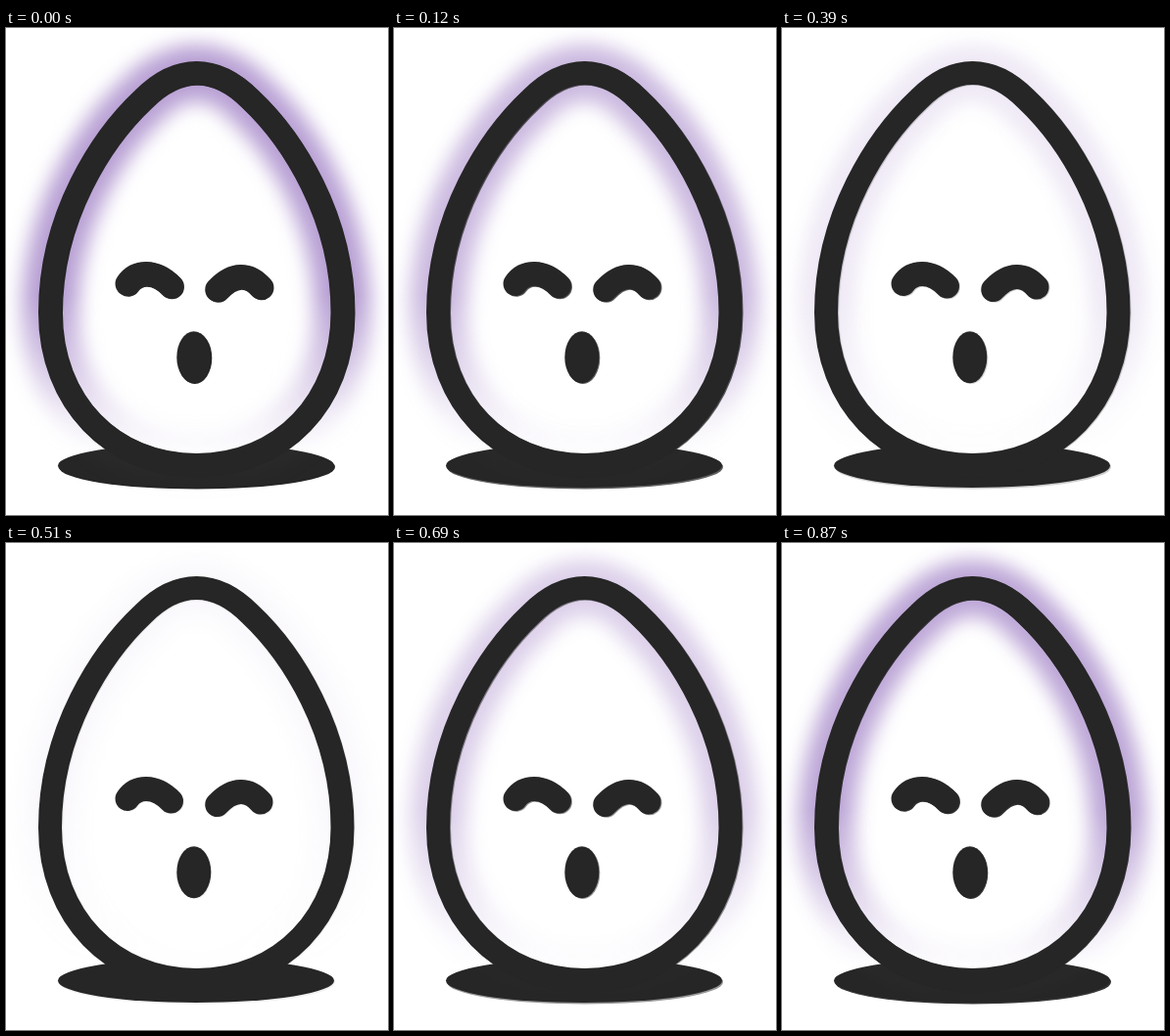
Write an HTML page that moves like this. It is 390 by 498 pixels and loops after 0.9 s.

```html
<!DOCTYPE html>
<html lang="en">
<head>
<meta charset="utf-8">
<title>Glowing egg</title>
<style>
  html, body { margin: 0; width: 100%; height: 100%; overflow: hidden; background: #fff; }
  svg { display: block; width: 390px; height: 498px; }
</style>
</head>
<body>
<svg viewBox="0 0 390 498">
  <defs>
    <path id="shell" d="M194.5 46 C172 46 155 57.5 140 72.5 C98 112 45 192 45 291
      C45 382 108 447 194.5 447 C281 447 343.5 382 343.5 291
      C343.5 192 291 112 249 72.5 C234 57.5 217 46 194.5 46Z"/>
    <ellipse id="ground" cx="194" cy="447.5" rx="141" ry="22.5" fill="#262626"/>
    <g id="ink" stroke-linecap="round" fill="none" stroke="#262626">
      <use href="#shell" stroke-width="24"/>
      <path stroke-width="25" d="M124 261.5 C133 248.5 152 247 168.5 264 M215.7 267.5 C232 250 248 251 260 265"/>
      <ellipse cx="191.8" cy="336.7" rx="17.5" ry="26.5" fill="#262626" stroke="none"/>
    </g>
    <filter id="soft" filterUnits="userSpaceOnUse" x="-40" y="-40" width="470" height="580" color-interpolation-filters="sRGB">
      <feGaussianBlur stdDeviation="10"/>
    </filter>
    <linearGradient id="fade" gradientUnits="userSpaceOnUse" x1="0" y1="0" x2="0" y2="498">
      <stop offset=".55" stop-color="#fff"/>
      <stop offset=".7" stop-color="#fff" stop-opacity=".55"/>
      <stop offset=".8" stop-color="#fff" stop-opacity=".2"/>
      <stop offset=".87" stop-color="#fff" stop-opacity=".03"/>
      <stop offset="1" stop-color="#fff" stop-opacity="0"/>
    </linearGradient>
    <mask id="lower" maskUnits="userSpaceOnUse" x="0" y="0" width="390" height="498">
      <rect width="390" height="498" fill="url(#fade)"/>
    </mask>
  </defs>
  <use class="pulse" href="#ground" x="1" y="1.5"/>
  <use href="#ground"/>
  <use href="#shell" fill="#fff"/>
  <g class="pulse" mask="url(#lower)">
    <use href="#shell" fill="none" stroke="#b8a0d4" stroke-width="58" filter="url(#soft)"/>
  </g>
  <use class="pulse" href="#ink" x="1" y=".7"/>
  <use href="#ink"/>
</svg>
<script>
  const STEP = 30, LOOP = 900, FALL = 18;
  // Return to full glow: quick at first, then slower.
  const RISE = [16, 14, 12, 10, 8, 7, 5, 4, 3, 2, 1];
  const parts = document.querySelectorAll('.pulse');
  const start = performance.now();

  function level(ms) {
    const n = Math.floor(ms / STEP);
    const dim = n <= FALL ? n : RISE[n - FALL - 1];
    return Math.pow(1 - dim / 20, 1.4);
  }

  function draw(now) {
    const v = level(Math.max(0, now - start) % LOOP);
    for (const part of parts) part.style.opacity = v;
    requestAnimationFrame(draw);
  }
  draw(start);
</script>
</body>
</html>
```
